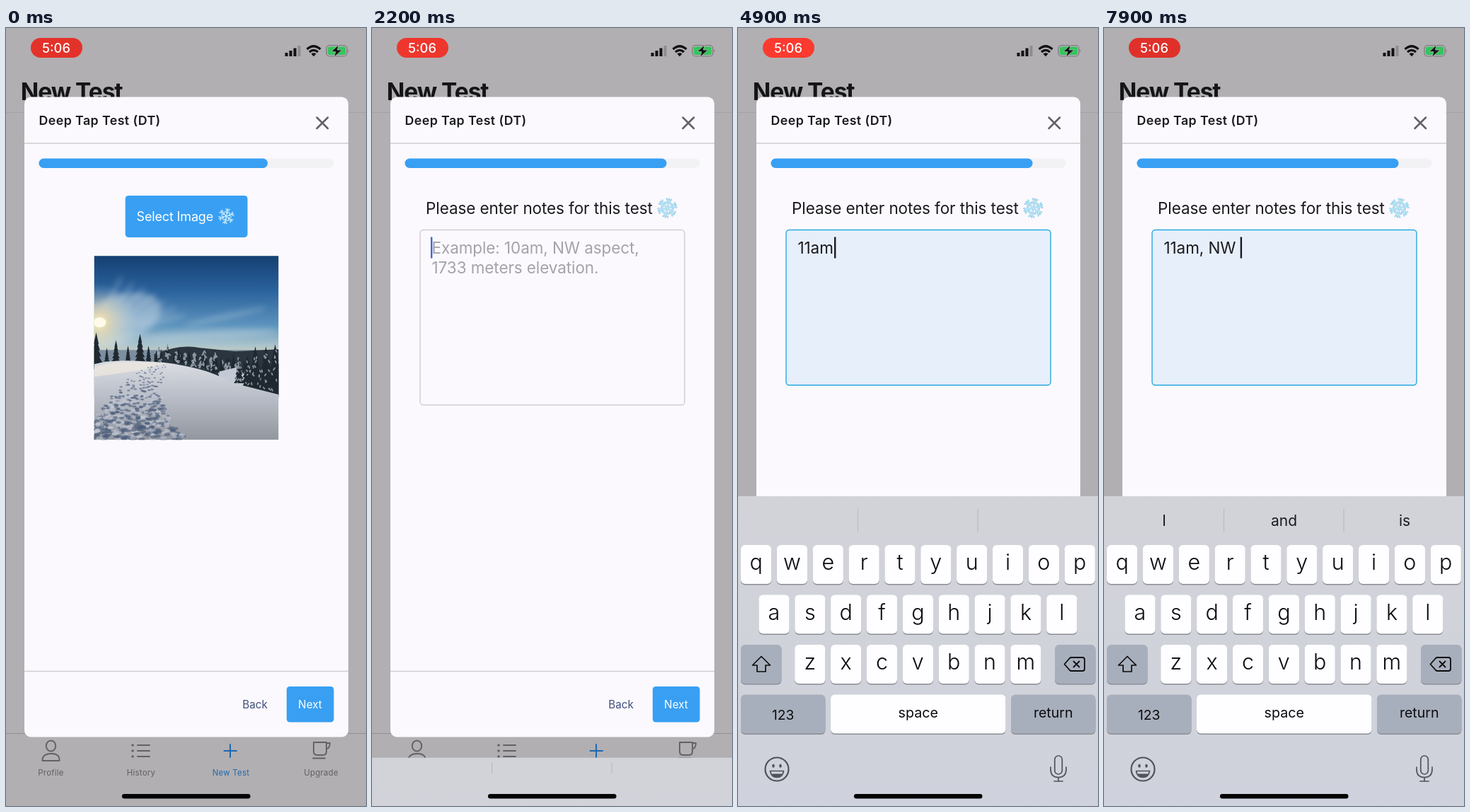
An HTML page for the animation above (8 s loop, 509 by 1100 pixels).

```html
<!DOCTYPE html>
<html lang="en">
<head>
<meta charset="utf-8">
<title>New Test</title>
<style>
  html, body { margin: 0; width: 100%; height: 100%; overflow: hidden; background: #b1afb2; }
  #stage { display: block; width: 509px; height: 1100px; font-family: Inter, Roboto, sans-serif; font-optical-sizing: none; }
  .mid { text-anchor: middle; }
  .line { fill: none; stroke-linecap: round; stroke-linejoin: round; }
  .note { font-size: 22.5px; letter-spacing: -.09px; }
</style>
</head>
<body>
<svg id="stage" viewBox="0 0 509 1100">
  <defs>
    <linearGradient id="sky" x2="0" y2="1">
      <stop offset="0" stop-color="#153f72"/><stop offset=".35" stop-color="#2a629d"/>
      <stop offset=".7" stop-color="#5c93bd"/><stop offset=".9" stop-color="#a9c3cc"/><stop offset="1" stop-color="#d3d0b8"/>
    </linearGradient>
    <radialGradient id="glow">
      <stop offset="0" stop-color="#fff3c4"/><stop offset=".25" stop-color="#f3dfae" stop-opacity=".75"/>
      <stop offset="1" stop-color="#d3dce0" stop-opacity="0"/>
    </radialGradient>
    <linearGradient id="snow" x2="0" y2="1">
      <stop offset="0" stop-color="#dcdee3"/><stop offset=".45" stop-color="#b9bec8"/><stop offset="1" stop-color="#92969e"/>
    </linearGradient>
    <linearGradient id="board" x2="0" y2="1">
      <stop offset="0" stop-color="#d2d3d9"/><stop offset="1" stop-color="#cfd2dc"/>
    </linearGradient>
    <filter id="soft" x="-50%" y="-50%" width="200%" height="200%"><feGaussianBlur stdDeviation="4"/></filter>
  </defs>

  <rect width="509" height="1100" fill="#b1afb2"/>
  <path d="M0 119.5H509" stroke="#a3a1a4"/>
  <path d="M0 997.5H509" stroke="#918f93" stroke-width="1.2"/>
  <text x="20.8" y="101.800" font-size="33.500" font-weight="700" letter-spacing="-1.05" fill="#151417">New Test</text>

  <rect id="pill" x="35" y="14" width="73" height="28" rx="14"/>
  <text class="mid" x="71" y="34.7" font-size="18.3" font-weight="500" fill="#fff">5:06</text>
  <path d="M394.500 35h4v5h-4zM400.500 32h4v8h-4zM406.500 28.500h4v11.500h-4z" fill="#111"/>
  <path d="M412.500 25h4v15h-4z" fill="#8e8c90"/>
  <g class="line" stroke="#111" stroke-width="3.200" style="stroke-linecap:butt">
    <path d="M425.500 30Q435 21.500 444.500 30M429 34Q435 28.800 441 34"/>
  </g>
  <path d="M431.500 36.500Q435 34 438.500 36.500L435 40.200Z" fill="#111"/>
  <rect x="453" y="24.500" width="29" height="15.500" rx="4.500" fill="none" stroke="#77767a" stroke-width="1.200"/>
  <rect x="455" y="26.500" width="25" height="11.500" rx="2.800" fill="#35c45d"/>
  <path d="M483.500 30q2 2.200 0 4.600z" fill="#77767a"/>
  <path d="M470 24L460 33.500H466L464 41L475 31H468.500Z" fill="#111" stroke="#b1afb2" stroke-width=".8"/>

  <g class="line" stroke="#626164" stroke-width="1.900">
    <ellipse cx="63.500" cy="1015" rx="6.700" ry="7.500"/>
    <path d="M51.500 1036Q51 1026.500 63.500 1026T75.500 1036Z"/>
    <path d="M186 1014H203M186 1022H203M186 1030H203"/>
    <path d="M179 1014h.1M179 1022h.1M179 1030h.1" stroke-width="3.400"/>
    <path d="M435 1010H453V1023Q453 1028 448 1028H440Q435 1028 435 1023ZM453 1011H458Q457.500 1019 453 1019M434 1032.500H451"/>
    <path d="M308.500 1022H326M317 1013V1031" stroke="#1d68b0" stroke-width="2"/>
  </g>
  <g class="mid" font-size="11.400" letter-spacing=".28" fill="#5f5e61">
    <text x="63.500" y="1057">Profile</text>
    <text x="191" y="1057">History</text>
    <text x="318" y="1057" fill="#2069ad">New Test</text>
    <text x="445.500" y="1057">Upgrade</text>
  </g>

  <rect x="26" y="97.500" width="458" height="905" rx="9.500" fill="#fbf9fd"/>
  <path d="M26 163H484M26 909.500H484" stroke="#cfced2" stroke-width="1.400"/>
  <text x="46.500" y="136.800" font-size="17.800" font-weight="600" letter-spacing=".42" fill="#1b1a1e">Deep Tap Test (DT)</text>
  <path class="line" d="M439.500 126.500L455 142M455 126.500L439.500 142" stroke="#626164" stroke-width="2.500"/>
  <rect x="46.500" y="184.500" width="417" height="13.500" rx="6.700" fill="#f2f1f4"/>
  <rect id="bar" x="46.500" y="184.500" height="13.500" rx="6.700" fill="#389ff3"/>
  <text class="mid" x="352" y="962.300" font-size="15.200" fill="#41507c">Back</text>
  <rect id="next" x="396.800" y="931" width="66.700" height="50.500" rx="4.500"/>
  <text class="mid" x="430" y="962.300" font-size="15.300" fill="#fff">Next</text>

  <g id="photoPage">
    <rect x="168.700" y="237" width="172.800" height="59" rx="4.500" fill="#389ff3"/>
    <text x="184.500" y="273" font-size="18" letter-spacing="-.15" fill="#fff">Select Image</text>
    <svg id="photo" x="124.500" y="322" width="261" height="260.500" viewBox="0 0 261 260"></svg>
  </g>

  <g id="notesPage">
    <text class="note" x="76" y="262.500" fill="#1b1a1e">Please enter notes for this test</text>
    <rect id="box" x="68" y="285.500" width="374" rx="4.500" stroke-width="1.400"/>
    <g id="hint" class="note" fill="#a5a3a9">
      <text x="84.500" y="319">Example: 10am, NW aspect,</text>
      <text x="84.500" y="347">1733 meters elevation.</text>
    </g>
    <text id="typed" class="note" x="84.500" y="319" fill="#1b1a1e"></text>
    <rect id="caret" y="295.500" width="2.400" height="30"/>
  </g>

  <g id="keyboard">
    <rect y="662" width="509" height="440" fill="url(#board)"/>
    <path id="split" stroke="#b9bbc2" stroke-width="1.200"/>
    <g id="words" class="mid" font-size="21" fill="#1b1a1e">
      <text x="85" y="703.500">I</text><text x="254.500" y="703.500">and</text><text x="425" y="703.500">is</text>
    </g>
    <g id="keys"></g>
    <g class="line" stroke="#50535a" stroke-width="2.200">
      <circle cx="55" cy="1048" r="16.500"/>
      <path d="M45.500 1050.500H64.500Q63 1059.500 55 1059.500T45.500 1050.500Z" stroke-width="1.700"/>
      <path d="M47.500 1054.500H62.500Q60 1059 55 1059T47.500 1054.500Z" fill="#50535a" stroke="none"/>
      <path d="M50 1042.500v1.500M60 1042.500v1.500" stroke-width="3.400"/>
      <rect x="447.800" y="1029" width="10.500" height="26" rx="5.200" stroke-width="1.700"/>
      <path d="M442 1045V1048Q442 1059.500 453 1059.500T464 1048V1045M453 1059.500V1065M447 1065H459" stroke-width="1.700"/>
    </g>
  </g>
  <rect x="164" y="1083" width="181.500" height="6.500" rx="3.200" fill="#050506"/>
</svg>

<script>
const LOOP = 8000, TICK = 100;
const $ = id => document.getElementById(id);
const show = (el, on) => { el.style.display = on ? '' : 'none'; };
const set = (el, attrs) => { for (const k in attrs) el.setAttribute(k, attrs[k]); };
const clamp = x => Math.max(0, Math.min(1, x));
const mix = (a, b, k) => a + (b - a) * k;

function flake(x, y, r, color, width) {
  const arm = `M0 0V${-r}M${-r * .26} ${-r * .95}L0 ${-r * .68}L${r * .26} ${-r * .95}M${-r * .24} ${-r * .6}L0 ${-r * .36}L${r * .24} ${-r * .6}`;
  let arms = '';
  for (let a = 0; a < 360; a += 60) arms += `<path d="${arm}" transform="rotate(${a})"/>`;
  return `<g class="line" transform="translate(${x} ${y}) rotate(12)" stroke="${color}" stroke-width="${width}">${arms}</g>`;
}

// Winter landscape
let seed = 7;
const rnd = (a = 0, b = 1) => {
  seed = (seed * 16807) % 2147483647;
  return mix(a, b, seed / 2147483647);
};

function tree(x, base, h, snowy) {
  const w = h * .2;
  let d = '', caps = '';
  for (let i = 0; i < 5; i++) {
    const y = base - h + h * i * .17, s = w * (.35 + i * .17);
    d += `M${x} ${y}L${x + s} ${y + h * .32}H${x - s}Z`;
  }
  for (let i = 0; snowy && i < 14; i++) {
    const v = rnd(.1, 1), s = w * v;
    caps += `M${x + rnd(-s, s)} ${base - h + h * v}l${rnd(-2, 2)} ${rnd(1, 3)}`;
  }
  return `<path d="${d}" fill="#1f2830"/><path d="${caps}" class="line" stroke="#aeb8c6" stroke-width="1.800" opacity=".75"/>`;
}

function streak(x, y, rx, ry, turn, opacity) {
  return `<ellipse cx="${x}" cy="${y}" rx="${rx}" ry="${ry}" opacity="${opacity}" transform="rotate(${turn} ${x} ${y})"/>`;
}

function landscape() {
  let s = '<rect width="261" height="140" fill="url(#sky)"/><g fill="#dbe4ea" filter="url(#soft)">';
  s += streak(35, 90, 62, 34, -20, .38);
  for (let i = 0; i < 7; i++) s += streak(22 + i * 12, 62 + i * 5, 38, 3.5, -62 + i * 8, .3);
  s += streak(185, 86, 60, 2.5, -12, .4) + streak(160, 112, 100, 7, -3, .3) + '</g>';
  s += '<circle cx="7" cy="94" r="55" fill="url(#glow)"/><ellipse cx="8" cy="94" rx="9" ry="7" fill="#fffbea"/>';
  s += '<path d="M0 133H261V200H0Z" fill="#7c8ea0"/><path d="M85 139Q122 124 150 130L200 135L261 132V200H85Z" fill="#2a353f"/>';
  for (let i = 0; i < 44; i++) {
    const x = rnd(88, 225);
    s += tree(x, 145 + Math.max(0, x - 110) * .2 + rnd(-4, 5), rnd(10, 20), i % 2);
  }
  s += '<path d="M175 164L200 158 232 181 261 186V200H185Z" fill="#c3cad5"/>';
  for (const [x, y, h] of [[3, 160, 52], [18, 149, 19], [31, 150, 31], [48, 149, 22], [65, 150, 40], [77, 151, 24], [88, 152, 18]]) s += tree(x, y, h);
  for (const [x, y, h] of [[156, 158, 28], [171, 165, 32], [205, 180, 36], [217, 188, 48], [228, 190, 62], [243, 194, 66], [256, 197, 72]]) s += tree(x, y, h, true);
  s += '<path d="M0 153Q30 146 70 149Q103 150 120 154Q165 161 194 179L261 196V260H0Z" fill="url(#snow)"/>';
  s += '<path d="M8 155Q40 147 100 152L70 161 0 171V157Z" fill="#f0e9de" opacity=".7"/>';
  for (let i = 0; i < 520; i++) {
    const v = rnd() ** .7, y = 154 + v * 106;
    const left = 96 - 110 * Math.sqrt(v), right = 104 - 14 * Math.sin(v * 3) + 30 * v * v;
    const x = mix(left, right, rnd()), r = .8 + v * 2.2;
    s += `<ellipse cx="${x.toFixed(1)}" cy="${y.toFixed(1)}" rx="${(r * 1.5).toFixed(1)}" ry="${(r * .8).toFixed(1)}" fill="${i % 5 < 3 ? '#4c5c7b' : '#c3c9d4'}" opacity=".6"/>`;
  }
  return s;
}

// Keyboard layouts
const WHITE = '#fefdff', GREY = '#a8afbc', PITCH = 50.85;
const ROWS = [731, 801.5, 872, 942.5];

function key(x, y, w, label, size, drop, fill = WHITE, weight = 400) {
  const text = label.replace('&', '&amp;');
  return `<rect x="${x}" y="${y + 1.5}" width="${w}" height="55" rx="6" fill="#8b8d94"/>
    <rect x="${x}" y="${y}" width="${w}" height="55" rx="6" fill="${fill}"/>
    <text class="mid" x="${x + w / 2}" y="${y + drop}" font-size="${size}" font-weight="${weight}" fill="#0c0c0e">${text}</text>`;
}

function layout(name, rows, size, drop, weight) {
  const digits = name == 'num', caps = name == 'upper';
  let s = '';
  rows.forEach((row, r) => {
    const wide = digits && r == 2;
    const x0 = r == 2 ? 80.2 : r == 1 && !digits ? 29.4 : 4;
    [...row].forEach((c, i) => {
      s += key(x0 + i * (wide ? 71.5 : PITCH), ROWS[r], wide ? 63.5 : 43.2, c, size, drop, WHITE, weight);
    });
  });
  s += key(4, ROWS[2], 57.5, digits ? '#+=' : '', 16.8, 34, caps ? WHITE : GREY);
  if (!digits) s += `<path class="line" d="M33 888.500L45.500 901H39V910H27V901H20.500Z" stroke="#0c0c0e" stroke-width="1.700" style="fill:${caps ? '#000' : 'none'}"/>`;
  s += key(448, ROWS[2], 57.5, '', 1, 0, GREY);
  s += '<path class="line" d="M461.500 899.500L469 891Q470 890 471.500 890H487Q490 890 490 893V906Q490 909 487 909H471.500Q470 909 469 908ZM474.500 895.500l8 8m0-8l-8 8" stroke="#0c0c0e" stroke-width="1.800"/>';
  s += key(4, ROWS[3], 119.5, digits ? 'ABC' : '123', 19.3, 35, GREY);
  s += key(131, ROWS[3], 247.5, 'space', 19.7, 32.5);
  s += key(386, ROWS[3], 119.5, 'return', 19.6, 32.5, GREY);
  return `<g id="${name}">${s}</g>`;
}

$('photo').innerHTML = landscape();
$('photoPage').insertAdjacentHTML('beforeend', flake(311.5, 266, 10.8, '#c9ecfb', 1.3));
$('notesPage').insertAdjacentHTML('beforeend', flake(417.5, 254.5, 13.2, '#7cc3e4', 2.2) + flake(417.5, 254.5, 13, '#c9ebf8', 1.1));
$('keys').innerHTML =
  layout('upper', ['QWERTYUIOP', 'ASDFGHJKL', 'ZXCVBNM'], 27.5, 38, 400) +
  layout('num', ['1234567890', '-/:;()$&@″', '.,?!′'], 27.5, 38.5, 400) +
  layout('lower', ['qwertyuiop', 'asdfghjkl', 'zxcvbnm'], 30.5, 35, 300);

// time, text, caret x, layout
const STEPS = [
  [0, '', 83, 'upper'],
  [2900, '', 83, 'num'],
  [3300, '1', 93, 'num'],
  [3600, '11', 104, 'num'],
  [4100, '11', 104, 'lower'],
  [4400, '11a', 117, 'lower'],
  [4700, '11am', 136, 'lower'],
  [5100, '11am', 136, 'num'],
  [5400, '11am,', 142, 'num'],
  [5800, '11am, ', 148, 'lower'],
  [6200, '11am, ', 148, 'upper'],
  [6500, '11am, N', 165, 'lower'],
  [6800, '11am, N', 165, 'upper'],
  [7200, '11am, NW', 187, 'lower'],
  [7600, '11am, NW ', 192.7, 'lower']
];
const PRESS = 1100, TURN = 1400, TOUCH = 2100, RISE = 2160, FOCUS = 2300, SUGGEST = 7600;

function render(time) {
  const t = Math.floor((time + 2) / TICK) * TICK % LOOP;
  const [, text, x, name] = STEPS.filter(s => s[0] <= t).pop();

  const pulse = (1 - Math.cos((t - 3700) / 1000 * Math.PI)) / 2;
  set($('pill'), { fill: `rgb(${mix(220, 255, pulse)},${mix(48, 59, pulse)},${mix(41, 48, pulse)})` });

  const fill = 1 - (1 - clamp((t - TURN + 100) / 300)) ** 2;
  set($('bar'), { width: t < TURN ? 323.5 : mix(323.5, 370, fill) });
  set($('next'), { fill: t >= PRESS && t < TURN ? '#1b92f3' : '#389ff3' });
  show($('photoPage'), t < TURN);
  show($('notesPage'), t >= TURN);

  const focused = t >= FOCUS;
  set($('box'), {
    height: text ? 219.5 : 247.5,
    fill: focused ? '#e7effa' : '#fbf9fd',
    stroke: focused ? '#27aae1' : '#cfced2'
  });
  show($('hint'), !text);
  $('typed').textContent = text;
  show($('caret'), t >= TOUCH);
  set($('caret'), { x, fill: focused ? '#1b1a1e' : '#3f67d8' });

  // critically damped rise
  const w = Math.max(0, t - RISE) * .0175;
  const away = (1 + w) * Math.exp(-w), top = 662 + mix(18, 5, away), h = mix(32, 12, away);
  show($('keyboard'), t > RISE);
  set($('keyboard'), { transform: `translate(0 ${438 * away})` });
  set($('split'), { d: `M169.500 ${top}v${h}M339 ${top}v${h}` });
  for (const n of ['upper', 'num', 'lower']) show($(n), n == name);
  show($('words'), t >= SUGGEST);
}

const start = performance.now();
function frame() {
  render((performance.now() - start) % LOOP);
  requestAnimationFrame(frame);
}
frame();
</script>
</body>
</html>
```
